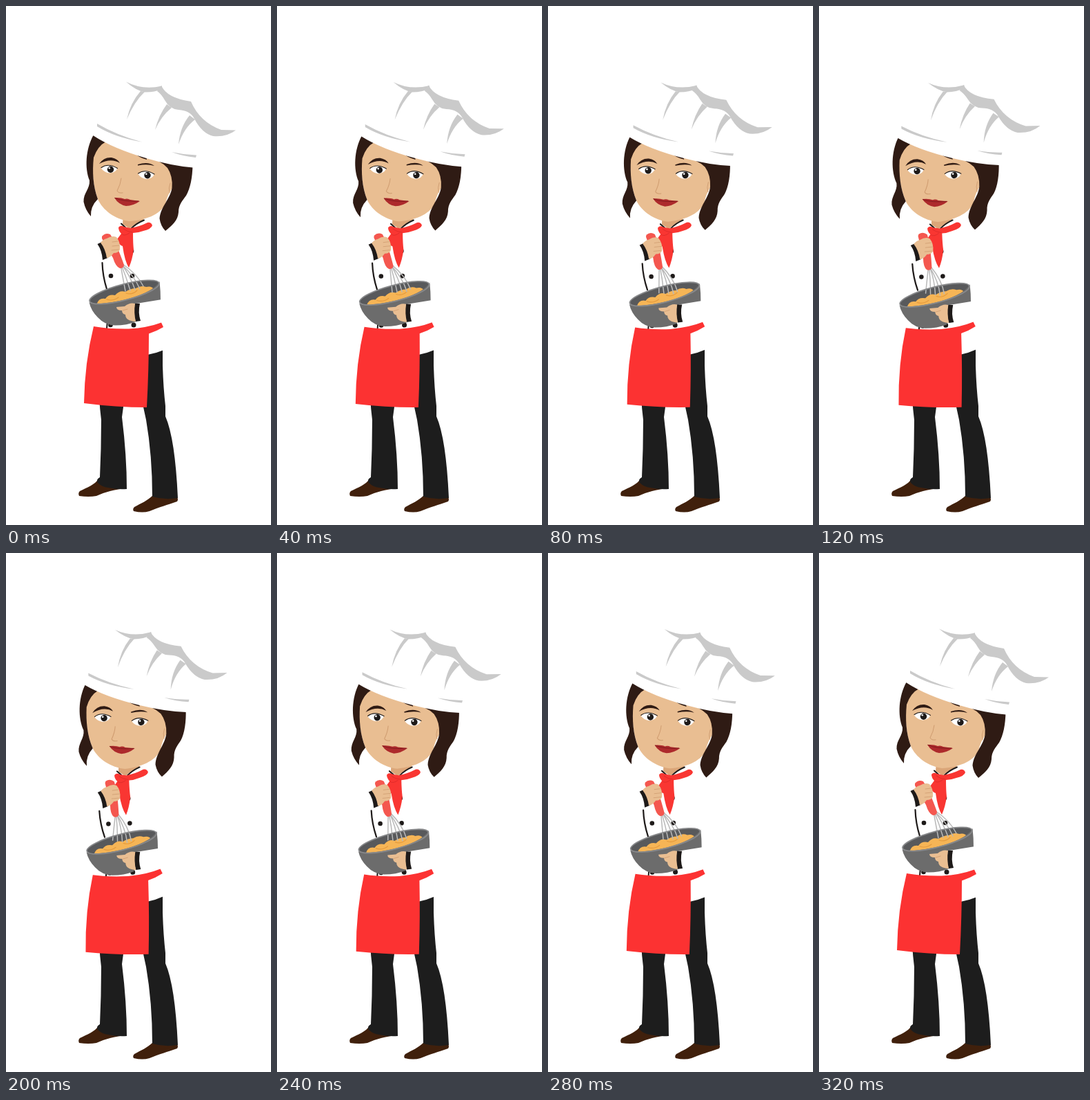
An HTML page with a canvas that plays this animation: 384x750 px, repeating every 0.36 s.

```html
<!DOCTYPE html>
<html lang="en">
<head>
<meta charset="utf-8">
<title>Chef whisking</title>
<style>
  html, body { margin: 0; width: 100%; height: 100%; overflow: hidden; background: #fff; }
  canvas { display: block; }
</style>
</head>
<body>
<canvas id="stage" width="384" height="750"></canvas>
<script>
const ctx = document.getElementById('stage').getContext('2d');

const STEP = 40, STEPS = 9;
const RAD = Math.PI / 180;
const C = {
  hair: '#2f1b14', skin: '#e9be92', crease: '#cf9c70', neck: '#dba679',
  red: '#fc3232', scarf: '#f93632', fold: '#dc2a29', pants: '#1d1d1d',
  shoe: '#40200c', ink: '#1e1a19', grey: '#cacaca', bowl: '#6c6c6c',
  inside: '#58595b', rim: '#88898b', dough: '#f6b556', doughDark: '#e59a3c',
  handle: '#f4574f', wire: '#b9b9b9', lips: '#ad2a2c', lipLine: '#7d1a1c',
  white: '#fff'
};

function fill(color, d) {
  ctx.fillStyle = color;
  ctx.fill(new Path2D(d));
}

function line(color, width, d) {
  ctx.strokeStyle = color;
  ctx.lineWidth = width;
  ctx.lineCap = ctx.lineJoin = 'round';
  ctx.stroke(new Path2D(d));
}

function dot(color, x, y, r) {
  ctx.fillStyle = color;
  ctx.beginPath();
  ctx.arc(x, y, r, 0, 7);
  ctx.fill();
}

function group(draw, { x = 0, y = 0, turn = 0, px = 0, py = 0 }) {
  ctx.save();
  ctx.translate(px + x, py + y);
  ctx.rotate(turn * RAD);
  ctx.translate(-px, -py);
  draw();
  ctx.restore();
}

function legs() {
  fill(C.shoe, 'M134 683C129 692 117 696 107 701Q104 704 106 708Q120 710 131 708C144 702 157 699 173 697L172 690Z');
  fill(C.shoe, 'M213 707C205 715 195 719 186 724Q183 727 185 730Q198 733 208 730C222 724 234 721 248 716Q250 713 248 710Z');
  fill(C.pants, 'M135 565Q136 583 138 598Q138 640 136 681Q130 684 133 689Q139 695 148 696Q161 699 175 698Q175 650 168 594L172 565Z');
  fill(C.pants, 'M196 480L227 480L227 520Q228 552 231 578L231 593Q245 625 249 711Q229 714 212 709Q212 650 203 598L198 575Z');
}

function jacket() {
  fill(C.white, 'M190 430L230 430L227.500 497.500Q217 502 205 504L190 504Z');
  line(C.ink, 2.2, 'M139.500 371Q140 390 146 409');
  line(C.ink, 2, 'M147 455L146 466');
  dot(C.ink, 152, 390, 3.3);
  dot(C.ink, 183, 390, 3.3);
  dot(C.ink, 182, 354, 3.3);
  dot(C.ink, 151.500, 461, 3.3);
  dot(C.ink, 185, 461, 3.5);
}

function apron() {
  fill(C.red, 'M127 463Q150 467 178 466.500Q205 465 225 457.500L228 464Q218 470 207 473.500Q207 525 204 580Q160 580 113 574Q114 515 127 463Z');
}

function neck() {
  fill(C.neck, 'M170 300L201 300L199 310Q187 314 179 322L169 315Z');
  line(C.ink, 2, 'M167 314.500L173 320M200 309.500Q189 314 182 321');
}

function scarf() {
  fill(C.scarf, 'M163 320Q166 316 171 319L180 321Q193 319 205 313Q210 312 212 317Q211 322 199 325Q191 328 184 328Q184 343 185 352Q183 367 178 378Q172 369 169 347Q163 345 161 337L167 329Q163 325 163 320Z');
  line(C.fold, 0.8, 'M170 322Q175 326 183 327M168 330Q172 333 179 328');
}

function eye(x, y) {
  fill(C.white, `M${x - 12} ${y - 1}Q${x - 3} ${y - 10} ${x + 11} ${y - 1}Q${x + 10} ${y + 5} ${x} ${y + 6}Q${x - 8} ${y + 5} ${x - 12} ${y - 1}Z`);
  dot(C.ink, x + 1.5, y + 0.7, 4.7);
  dot(C.white, x - 0.2, y - 1.2, 1.3);
  line(C.ink, 1.1, `M${x - 12} ${y - 2}Q${x - 2} ${y - 9} ${x + 11.5} ${y - 1}`);
}

function head() {
  fill(C.skin, 'M128 180L250 215L242 262Q234 272 231 286C223 302 201 310 178 311C158 308 140 295 133 279C126 260 125 240 126 222Z');

  // hair on both sides
  fill(C.hair, 'M127 186C115 207 114 235 121 252C122 264 112 270 112.500 283Q115 295 123 304Q122 290 133 279C126 260 125 240 127 219Q133 202 145 196Z');
  fill(C.hair, 'M202 218Q223 222 234 234Q242 246 240.500 263C238 279 224 290 222.500 307Q224 318 231 325C241 317 249 310 250 298C250 287 256 281 261 274Q270 258 270.500 229L236 222Z');
  fill(C.hair, 'M183 210Q192 219 204 222L203 216Z');

  // features
  eye(150, 235.500);
  eye(203.500, 244);
  fill(C.hair, 'M135 228Q142 218 153 219Q162 221 165 227Q152 219 135 228Z');
  fill(C.hair, 'M191 229Q206 224 215 231Q205 228 191 230.500Z');
  line(C.crease, 1, 'M167 249Q166 258 161 267Q163 271 169 270');
  fill(C.lips, 'M157 277Q167 276.500 172 279Q176 277.500 180 280L194 282Q184 289 174 289Q163 287 157 277Z');
  line(C.lipLine, 0.9, 'M158 277.500Q170 283 192 282');
  line(C.crease, 0.9, 'M238 256Q235 263 237 270');

  // hat
  fill(C.white, 'M124 187Q130 176 130 168L175 112L224 116L268 138L330 181L278 212L271 233.500Q240 231 205 220.500Q155 206 126 187Z');
  fill(C.grey, 'M174 109.500Q198 122 226 115.500L226 120Q214 125 201 124.500Q188 122 174 109.500Z');
  fill(C.grey, 'M225 115Q233 133 268 138Q281 168 312 179L333 179.500Q319 190 300 188Q284 184 273 163Q267 151 250 150Q237 149 230 136Q225 127 219 123Z');
  fill(C.grey, 'M195 123L201 124Q186 138 175 164Q180 140 195 123Z');
  fill(C.grey, 'M233 142L240 147Q225 159 216 179Q221 158 233 142Z');
  fill(C.grey, 'M266 158L274 164Q258 176 250 200Q252 175 266 158Z');
  fill(C.grey, 'M132 170Q161 187 197 196.500Q158 190 132 174Z');
  fill(C.grey, 'M240 211Q258 215 276 215.500L275 219Q256 217 240 211Z');
}

function rimPath() {
  ctx.beginPath();
  ctx.ellipse(171.500, 413.500, 52, 11.5, -14.5 * RAD, 0, 7);
}

function bowlBack() {
  ctx.save();
  rimPath();
  ctx.fillStyle = C.inside;
  ctx.fill();
  ctx.clip();
  fill(C.dough, 'M131 432Q134 421 144 423Q149 416 158 418Q165 410 173 413Q181 408 188 408Q196 403 203 406Q211 404 214 409L203 435Z');
  line(C.doughDark, 1.2, 'M146 424Q155 427 163 421M174 415Q183 418 190 411');
  ctx.restore();
}

function bowlFront() {
  fill(C.bowl, 'M120.500 428Q126 432 142 429.500Q184 425 210 410Q219 404 222.500 398Q224 411 224 426L196 440L189 456Q175 461.500 158 461.500Q143 461 133 450Q123 440 120.500 428Z');
  rimPath();
  ctx.strokeStyle = C.rim;
  ctx.lineWidth = 1.8;
  ctx.stroke();
}

function whisk() {
  line(C.wire, 1.5, 'M166 374Q169 391 173 412M167 374Q174 391 180 411M168 374Q180 390 187 410M168 374Q186 390 194 409M169 373Q190 387 199 405');
  fill(C.handle, 'M139 333Q144 327 151 330Q160 343 171 374Q171 379 165 379Q159 377 155 364Q146 348 139 336Z');
}

function whiskHand() {
  fill(C.ink, 'M132.500 344L139 341Q145 352 147.500 364L140 367Q139 353 132.500 344Z');
  fill(C.skin, 'M137 342Q141 337 146 336Q154 331 160 334Q166 341 165 352Q163 357 156 357Q151 364 146 364Q144 351 137 342Z');
  line(C.crease, 0.8, 'M154 341L162 340M154 347L164 346M153 353L163 352');
}

function bowlHand() {
  fill(C.white, 'M189 430L226 424L228 456L195 458Z');
  fill(C.ink, 'M187 430L194 430Q191 443 195 455L188 456Q184 443 187 430Z');
  fill(C.skin, 'M187 430Q179 428 172 434L160 435Q160 440 168 440Q168 445 173 446Q173 455 188 456Q185 443 187 430Z');
  line(C.crease, 0.8, 'M169 440L176 438');
}

function draw(k) {
  const torso = { turn: -0.63 * k, px: 195, py: 500 };
  const bowl = { x: -1.3 * k, y: 1.45 * k };
  const arm = { x: 0.1 * k, y: 0.7 * k };

  ctx.fillStyle = C.white;
  ctx.fillRect(0, 0, 384, 750);
  legs();
  group(() => { jacket(); neck(); }, torso);
  group(head, { turn: -0.96 * k, px: 195, py: 425 });
  group(scarf, torso);
  group(bowlBack, bowl);
  group(whisk, { turn: 5.5 * k, px: 153, py: 350 });
  group(whiskHand, arm);
  group(bowlFront, bowl);
  group(bowlHand, arm);
  group(apron, torso);
}

// The pose swings out over four steps and back over four.
function tick() {
  const n = Math.floor(performance.now() / STEP) % STEPS;
  draw(Math.min(n, STEPS - 1 - n));
  requestAnimationFrame(tick);
}
tick();
</script>
</body>
</html>
```
